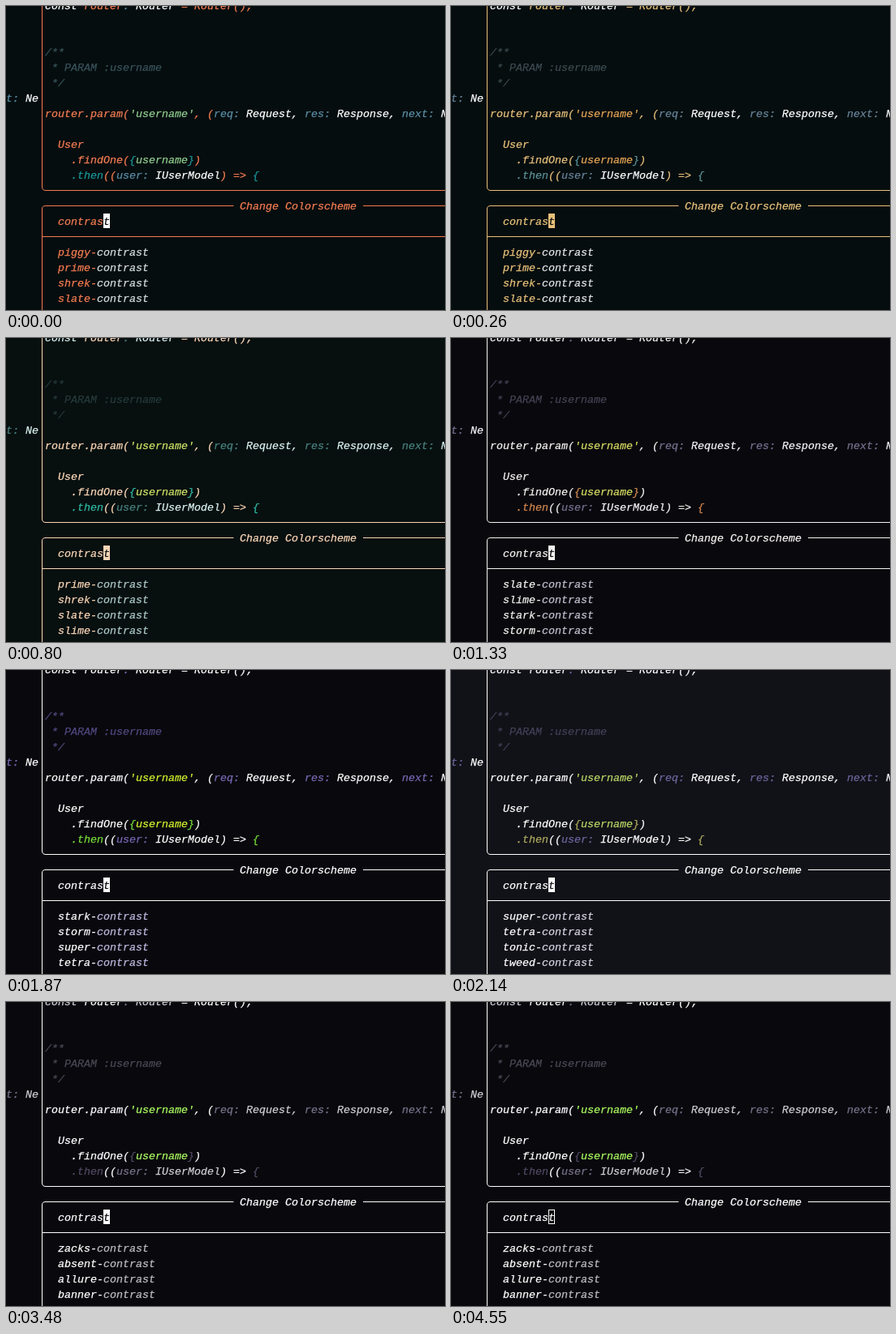
Write an HTML page with a canvas that moves like this. It is 541x375 px and loops after 4.82 s.

```html
<!DOCTYPE html>
<html lang="en">
<head>
<meta charset="utf-8">
<title>Colorscheme picker</title>
<style>
html, body { margin: 0; width: 100%; height: 100%; overflow: hidden; background: #09080d; }
canvas { display: block; }
</style>
</head>
<body>
<canvas id="stage" width="541" height="375"></canvas>
<script>
const ctx = document.getElementById('stage').getContext('2d');
const LOOP = 4820, BLUR_AT = 4550, CELL = 8, ROW = 19;

const schemes = `piggy prime shrek slate slime stark storm super tetra tonic tweed waste
  zacks absent allure banner coffee`.split(/\s+/);

// start time, first visible scheme, then the colours in the order of `roles`
const roles = ['bg', 'base', 'comment', 'string', 'brace', 'param', 'type', 'match', 'method', 'cursor'];
const steps = [
  [0, 0, '#050d0f #f37b50 #38535a #8fcb8d #1b9496 #5a8ca4 #ffffff #d5dddd #1b9496 #ffffff'],
  [260, 0, '#050d0f #e8c07a #3c4a50 #e6a455 #5b9096 #688397 #ffffff #e2e5e4 #5b9096'],
  [530, 0, '#1e2025 #c9b28d #494c57 #eda64e #717892 #717892 #ffffff #ffffff #c9b28d'],
  [800, 1, '#070f0f #fad6b7 #263a3a #cde266 #2fb8a3 #47807e #daf2f0 #adc9c7 #2fb8a3'],
  [1070, 2, '#0b0e12 #f4e6d8 #36404d #b8d85c #4db07c #62798b #f2f6f8 #bdc8d0 #4db07c'],
  [1330, 3, '#09080d #f5f3f0 #454253 #d6dc62 #d2884e #77708f #f5f3f8 #c3bfd0 #d2884e'],
  [1600, 4, '#09080d #ffffff #4d4766 #a8e04c #58b9a0 #7767b0 #ffffff #c1bcd6 #58b9a0'],
  [1870, 5, '#09080d #ffffff #52487f #d2f22e #75dc38 #7767b0 #ffffff #beb7df #75dc38'],
  [2140, 7, '#111118 #ffffff #414158 #b8d565 #aca95c #6c659c #ffffff #d6d3e0 #aca95c'],
  [2680, 9, '#111118 #ffffff #383b53 #88c47e #ec7742 #5d5e90 #ffffff #f0f0f2 #ec7742'],
  [2940, 10, '#0d0c12 #ffffff #41404f #94d373 #a6684f #67658b #eeeeee #dcdce0 #a6684f'],
  [3210, 11, '#0d0c12 #ffffff #464350 #9de369 #79576a #706b8b #dfdfe3 #cdcdd2 #79576a'],
  [3480, 12, '#09080d #ffffff #4c4856 #aafa60 #504962 #777189 #cdcdd4 #bdbdc4 #504962']
].map(([at, first, list]) => {
  const colours = list.split(' ');
  const step = { at, first };
  roles.forEach((role, i) => step[role] = colours[i] || step.base);
  return step;
});

// row, column, then runs of role and text
const lines = [
  [0, 6, 'type', 'const ', 'base', 'router', 'param', ': ', 'type', 'Router', 'base', ' = Router();'],
  [3, 6, 'comment', '/**'],
  [4, 6, 'comment', ' * PARAM :username'],
  [5, 6, 'comment', ' */'],
  [6, 0, 'param', 't: ', 'type', 'Ne'],
  [7, 6, 'base', 'router.param(', 'string', "'username'", 'base', ', (', 'param', 'req: ', 'type', 'Request, ',
    'param', 'res: ', 'type', 'Response, ', 'param', 'next: ', 'type', 'Ne'],
  [9, 8, 'base', 'User'],
  [10, 10, 'base', '.findOne(', 'brace', '{', 'string', 'username', 'brace', '}', 'base', ')'],
  [11, 10, 'method', '.then', 'base', '((', 'param', 'user: ', 'type', 'IUserModel', 'base', ') => ', 'brace', '{'],
  [13, 36, 'base', 'Change Colorscheme'],
  [14, 8, 'base', 'contras']
];

function write(text, row, col, colour) {
  ctx.fillStyle = ctx.strokeStyle = colour;
  ctx.lineWidth = 0.25;
  ctx.fillText(text, col * CELL, row * ROW + 4);
  ctx.strokeText(text, col * CELL, row * ROW + 4);
}

function writeRuns([row, col, ...runs], theme) {
  for (let i = 0; i < runs.length; i += 2) {
    write(runs[i + 1], row, col, theme[runs[i]]);
    col += runs[i + 1].length;
  }
}

function drawBorders(colour) {
  ctx.strokeStyle = colour;
  ctx.lineWidth = 1;
  ctx.stroke(new Path2D(`M44.5 0V223Q44.5 227.5 49 227.5H541
    M44.5 375V250Q44.5 246.5 49 246.5H280.5 M440 246.5H541 M44.5 284.5H541`));
}

function drawCursor(theme, hollow) {
  if (hollow) {
    ctx.strokeStyle = theme.cursor;
    ctx.lineWidth = 1;
    ctx.strokeRect(120.5, 256.5, 7, 17);
  } else {
    ctx.fillStyle = theme.cursor;
    ctx.fillRect(120, 256, 8, 18);
  }
  write('t', 14, 15, hollow ? theme.base : theme.bg);
}

function draw() {
  const time = performance.now() % LOOP;
  const theme = steps.findLast(step => step.at <= time);
  ctx.fillStyle = theme.bg;
  ctx.fillRect(0, 0, 541, 375);
  ctx.font = "italic 13.333px 'Liberation Mono', monospace";
  drawBorders(theme.base);
  lines.forEach(line => writeRuns(line, theme));
  schemes.slice(theme.first, theme.first + 5).forEach((name, i) =>
    writeRuns([16 + i, 8, 'base', name + '-', 'match', 'contrast'], theme));
  drawCursor(theme, time >= BLUR_AT);
  requestAnimationFrame(draw);
}
draw();
</script>
</body>
</html>
```
